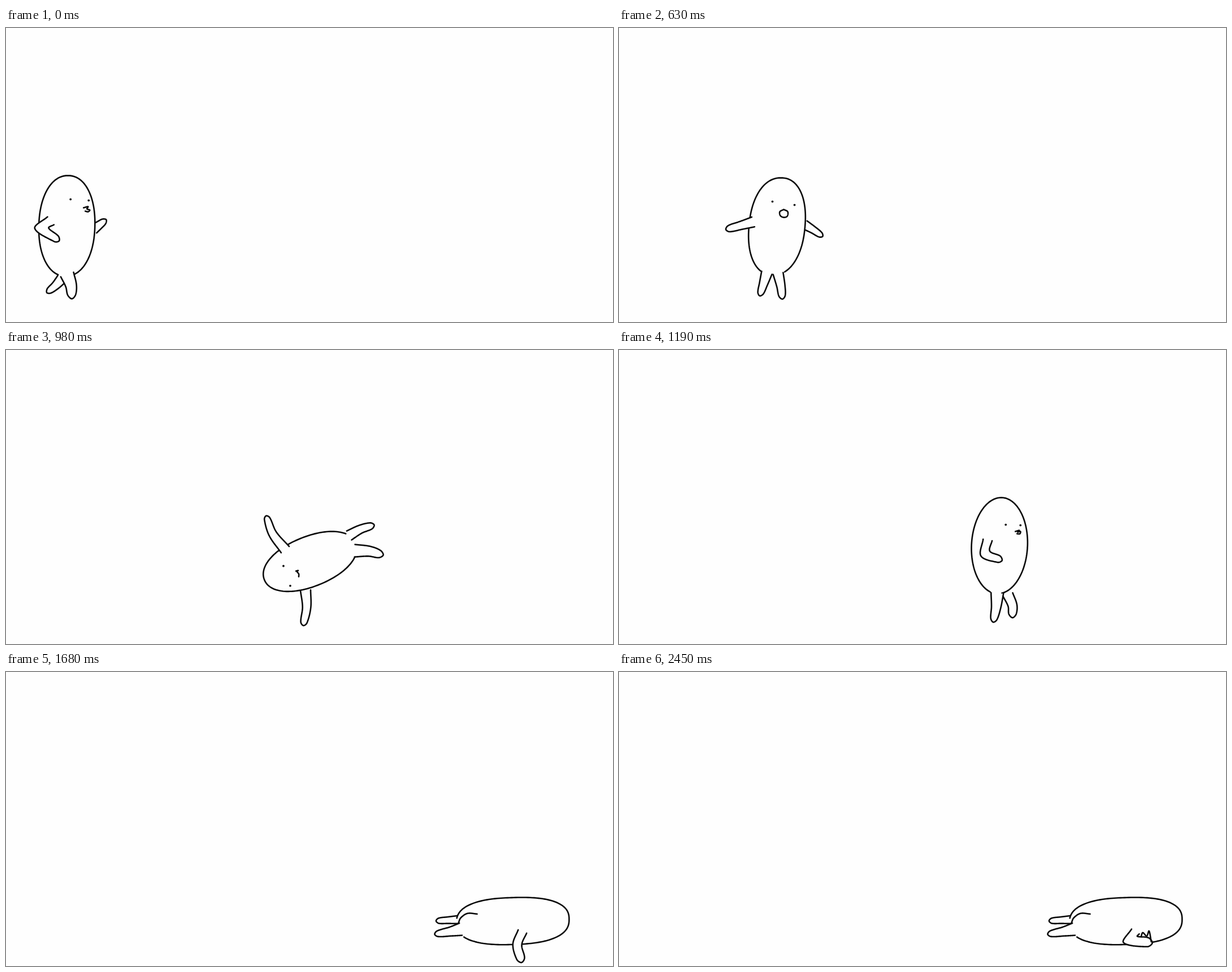
An HTML page with a canvas for the animation above (2520 ms loop, 1074 px wide and 521 px high).

```html
<!DOCTYPE html>
<html lang="en">
<head>
<meta charset="utf-8">
<title>Cartwheel</title>
<style>
html, body { margin: 0; width: 100%; height: 100%; overflow: hidden; background: #fefefe; }
canvas { display: block; }
</style>
</head>
<body>
<canvas id="stage" width="1074" height="521"></canvas>
<script>
const ctx = document.getElementById('stage').getContext('2d');
const STEP = 70, LOOP = 2520, N = 120, INK = '#0a0a0a';
const lerp = (a, b, m) => a + (b - a) * m;
const mix = (p, q, m) => [lerp(p[0], q[0], m), lerp(p[1], q[1], m)];
const dist = (p, q) => Math.hypot(q[0] - p[0], q[1] - p[1]);
const parse = s => s.split(' ').map(p => p.split(',').map(Number));

// Smooth curve through the points, weighted by chord length
function smooth(p) {
  if (p.length < 3) return p;
  const slope = i => {
    const a = p[Math.max(i - 1, 0)], b = p[i], c = p[Math.min(i + 1, p.length - 1)];
    const len = dist(a, b) + dist(b, c);
    return [(c[0] - a[0]) / len, (c[1] - a[1]) / len];
  };
  const out = [p[0]];
  for (let i = 0; i < p.length - 1; i++) {
    const a = p[i], b = p[i + 1], l = dist(a, b), u = slope(i), v = slope(i + 1);
    for (let k = 1; k <= 12; k++) {
      const t = k / 12, s = 1 - t;
      out.push([0, 1].map(j =>
        s * s * s * a[j] + 3 * s * s * t * (a[j] + u[j] * l / 3) +
        3 * s * t * t * (b[j] - v[j] * l / 3) + t * t * t * b[j]));
    }
  }
  return out;
}

// N + 1 points at equal distances along a polyline
function spread(p) {
  const at = [0];
  for (let i = 1; i < p.length; i++) at.push(at[i - 1] + dist(p[i - 1], p[i]));
  const out = [], total = at[at.length - 1];
  for (let k = 0, i = 1; k <= N; k++) {
    const d = total * k / N;
    while (i < p.length - 1 && at[i] < d) i++;
    out.push(mix(p[i - 1], p[i], (d - at[i - 1]) / (at[i] - at[i - 1] || 1)));
  }
  return out;
}

function place(points, x, y, angle) {
  const a = angle * Math.PI / 180, c = Math.cos(a), s = Math.sin(a);
  return points.map(([u, v]) => [x + u * c - v * s, y + u * s + v * c]);
}

// Superellipse that may lean and curl, open between the hips
function egg({ rx, ry, full = 2.1, lean = 0, curl = 0, hips: [left, right] }) {
  const pow = v => Math.sign(v) * Math.abs(v) ** (2 / full);
  return Array.from({ length: 201 }, (_, i) => {
    const a = lerp(left, 2 * Math.PI - right, i / 200), v = pow(Math.cos(a));
    return [lean * v + curl * v * v - rx * pow(Math.sin(a)), ry * v];
  });
}

// Outline around root, bend and tip, tapering from width w0 to w1
function limb(spine, w0, w1) {
  const [root, bend, tip] = parse(spine);
  const unit = (p, q) => [0, 1].map(j => (q[j] - p[j]) / dist(p, q));
  const turn = ([x, y]) => [-y, x];
  const off = (p, d, w) => [p[0] + d[0] * w, p[1] + d[1] * w];
  const ahead = unit(bend, tip), n0 = turn(unit(root, bend)), n1 = turn(ahead);
  const nb = unit([0, 0], off(n0, n1, 1));
  const wb = (w0 + w1) / 2 / Math.max(.6, nb[0] * n0[0] + nb[1] * n0[1]);
  return smooth([
    off(root, n0, w0), off(bend, nb, wb), off(tip, n1, w1), off(tip, ahead, w1),
    off(tip, n1, -w1), off(bend, nb, -wb), off(root, n0, -w0)
  ]);
}

const line = s => smooth(parse(s));
const USUAL = 'farLeg farArm body nearLeg nearArm';

// Limbs and lines are given on the stage and stored around an upright centre
function pose(x, y, turn, body, parts, order = USUAL) {
  const made = { x, y, turn, order: order.split(' '), body: spread(egg(body)) };
  for (const k in parts) {
    made[k] = place(spread(parts[k]).map(([u, v]) => [u - x, v - y]), 0, 0, -turn);
  }
  return made;
}

const stride = pose(107.5, 350, 0, { rx: 49.5, ry: 89, full: 2.15, lean: -2, hips: [.25, .25] }, {
  nearLeg: limb('108,436 115,456 116,472', 12, 7),
  farLeg: limb('98,444 87,456 76,465', 9, 5),
  nearArm: limb('79,341 63,354 89,373', 9, 6),
  farArm: limb('155,355 164,349 173,342', 9, 5),
  mouth: line('137,318 145,316 143,320 148,322 145,325 140,324'),
  eyes: line('114,303 146,305')
});
const stand = pose(215, 346, 0, { rx: 49.5, ry: 85, full: 2, lean: -3, hips: [.28, .14] }, {
  nearLeg: limb('211,430 209,455 205,476', 11, 5.5),
  farLeg: limb('230,433 238,452 238,467', 9, 6.5),
  nearArm: limb('194,336 190,360 214,370', 8, 6),
  farArm: limb('240,345 246,345 250,345', 5, 5),
  mouth: line('243,321 250,319 247,322 252,321 251,325 246,325'),
  eyes: line('226,309 252,310')
});
const open = pose(279, 351, 0, { rx: 49.5, ry: 86, full: 2.2, lean: -7, hips: [.38, .38] }, {
  nearLeg: limb('261,433 255,453 250,469', 9.5, 5),
  farLeg: limb('281,434 286,457 288,474', 9, 5.5),
  nearArm: limb('237,343 216,349 194,355', 9, 5.5),
  farArm: limb('328,348 343,357 356,366', 8, 4.5),
  mouth: line('291,321 298,325 297,333 291,335 285,332 284,325 291,321'),
  eyes: line('271,307 310,313')
});
const wheel = pose(537, 374, 248, { rx: 44, ry: 87, hips: [.5, .5] }, {
  nearLeg: limb('616,355 642,356 660,361', 11, 6.5),
  farLeg: limb('606,328 626,317 645,311', 9, 5.5),
  nearArm: limb('529,425 531,455 526,482', 9, 5.5),
  farArm: limb('493,353 471,325 461,298', 9, 5),
  mouth: line('512,391 516,390 514,392 517,396 517,401'),
  eyes: line('502,417 490,382')
}, 'farLeg nearArm body nearLeg farArm');
const tuck = pose(846, 320, 360, { rx: 42, ry: 77, full: 2.3, lean: 3, curl: 45, hips: [-.86, 1.3] }, {
  nearLeg: limb('895,371 903,357 933,380', 9, 6),
  farLeg: limb('904,350 922,353 939,370', 7, 4.5),
  nearArm: limb('823,279 828,296 855,283', 6, 5),
  farArm: limb('892,319 899,305 905,294', 6, 3.5),
  mouth: line('871,293 877,293 880,297 876,299 871,297 871,293'),
  eyes: line('867,277 895,291')
}, 'farLeg body nearLeg nearArm farArm');

const lie = parts => pose(895, 440.5, 450, { rx: 41.5, ry: 99.5, full: 2.5, lean: 3, hips: [.13, .58] }, {
  nearLeg: limb('803,455 785,459 762,463', 11, 5),
  farLeg: limb('798,438 780,439 764,440', 7, 4.5),
  crease: line('832,428 815,427 803,435 799,444'),
  ...parts
});
const flop = lie({ nearArm: limb('912,459 903,482 909,507', 8, 7) });
const flat = lie({
  nearArm: limb('912,459 903,473 934,478', 8, 8),
  thumb: line('922,468 925,461 932,467 936,458 940,477')
});

// Each key pose: step, shape, height of the hop towards the next one, place if moved
const keys = [
  { at: 0, shape: stride, hop: 3 },
  { at: 5, shape: stand, hop: 3 },
  { at: 9, shape: open },
  { at: 14, shape: wheel },
  { at: 17, shape: stand, hop: 50, x: 672, turn: 360 },
  { at: 21, shape: tuck, hop: 25 },
  { at: 24, shape: flop },
  { at: 25, shape: flop },
  { at: 28, shape: flat },
  { at: 36, shape: flat }
].map(k => ({ hop: 0, x: k.shape.x, y: k.shape.y, turn: k.shape.turn, ...k }));

function blend(a, b, m) {
  if (!a || !b) return m < .5 ? a : b;
  return a.map((p, i) => mix(p, b[i], m));
}

function trace(points, fill) {
  ctx.beginPath();
  points.forEach(p => ctx.lineTo(p[0], p[1]));
  if (fill) ctx.fill();
  ctx.stroke();
}

function dot([x, y]) {
  ctx.beginPath();
  ctx.arc(x, y, 1.9, 0, 7);
  ctx.fill();
}

function figure(n) {
  const i = keys.findIndex(k => k.at > n), from = keys[i - 1], to = keys[i];
  const m = (n - from.at) / (to.at - from.at), a = from.shape, b = to.shape;
  const x = lerp(from.x, to.x, m), turn = lerp(from.turn, to.turn, m);
  const y = lerp(from.y, to.y, m) - from.hop * 4 * m * (1 - m);
  const part = (k, use) => {
    const p = blend(a[k], b[k], m);
    if (p) use(place(p, x, y, turn));
  };
  ctx.fillStyle = '#fefefe';
  (m < .5 ? a : b).order.forEach(k => part(k, p => trace(p, true)));
  ['crease', 'thumb', 'mouth'].forEach(k => part(k, p => trace(p, false)));
  ctx.fillStyle = INK;
  part('eyes', p => [p[0], p[N]].forEach(dot));
}

// Small cloud that grows as it drifts away
function puff(k) {
  const x = 785 - 9 * k, y = 411 - 19 * k, r = 4 + 2.4 * k;
  ctx.beginPath();
  for (let i = 0; i < 5; i++) {
    const a = i * Math.PI * .4 - 1.6;
    ctx.arc(x + r * Math.cos(a), y + r * Math.sin(a), r * .7, a - 1.1, a + 1.1);
  }
  ctx.closePath();
  ctx.stroke();
}

function draw() {
  const n = Math.floor(performance.now() % LOOP / STEP);
  ctx.setTransform(1074 / 1072, 0, 0, 521 / 520, 0, 0);
  ctx.fillStyle = '#fefefe';
  ctx.fillRect(0, 0, 1074, 521);
  ctx.lineCap = ctx.lineJoin = 'round';
  ctx.lineWidth = 2.6;
  ctx.strokeStyle = INK;
  figure(n);
  if (n >= 30 && n < 35) puff(n - 30);
  requestAnimationFrame(draw);
}
draw();
</script>
</body>
</html>
```
